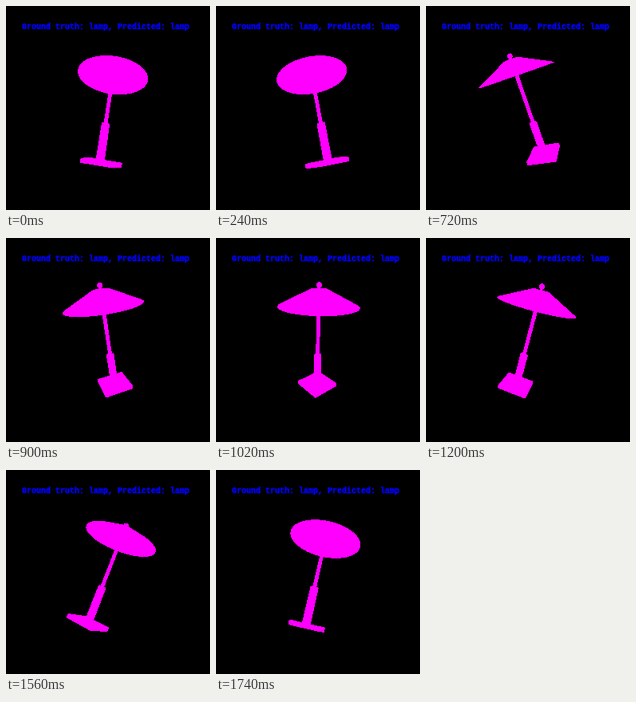
Recreate the animation shown at these times as an HTML page. Size 256 by 256 pixels, loop 1.8 s.

```html
<!DOCTYPE html>
<html lang="en">
<head>
<meta charset="utf-8">
<style>
  html, body { margin: 0; width: 100%; height: 100%; overflow: hidden; background: #000; }
  svg { display: block; width: 100vw; height: 100vh; }
  text {
    font: bold 10px "Liberation Mono", "Courier New", monospace;
    fill: #00f; stroke: #00f; stroke-width: .4; white-space: pre;
  }
  #lamp { fill: #f0f; stroke: #f0f; stroke-linejoin: round; shape-rendering: crispEdges; }
</style>
</head>
<body>
<svg viewBox="0 0 256 256">
  <rect width="256" height="256"/>
  <text x="20" y="29">Ground truth: lamp, Predicted: lamp</text>
  <g id="lamp">
    <path id="shade" stroke-width="1"/>
    <path id="base" stroke-width="3"/>
    <path id="poles" stroke-width="0"/>
    <circle id="finial" stroke-width="0"/>
  </g>
</svg>
<script>
const RAD = Math.PI / 180;
const STEP = 60, STEPS = 30;
const FOCAL = 128 / Math.tan(31 * RAD);
const TILT = 22.6 * RAD, START = -21 * RAD, BASE_TURN = 7 * RAD;
const part = id => document.getElementById(id);

function project([x, y, z]) {
  const scale = FOCAL / (FOCAL - z);
  return { x: 128 + x * scale, y: 128 - y * scale, scale };
}

// Maps lamp coordinates (height on axis, radius, angle) to the screen.
function lampView(turn) {
  const s = Math.sin(turn), c = Math.cos(turn);
  const st = Math.sin(TILT), ct = Math.cos(TILT);
  const axis = [-s * st, ct, -c * st];
  const u = [-s * ct, -st, -c * ct];
  const v = [c, 0, -s];
  return (h, r = 0, a = 0) => project(axis.map((k, i) =>
    k * h + r * (u[i] * Math.cos(a) + v[i] * Math.sin(a))));
}

function ring(view, h, r, count, offset = 0) {
  return Array.from({ length: count }, (_, i) =>
    view(h, r, offset + i * 2 * Math.PI / count));
}

function hull(points) {
  const sorted = [...points].sort((a, b) => a.x - b.x || a.y - b.y);
  const chain = list => {
    const out = [];
    for (const p of list) {
      while (out.length > 1) {
        const [a, b] = out.slice(-2);
        if ((b.x - a.x) * (p.y - a.y) - (b.y - a.y) * (p.x - a.x) > 0) break;
        out.pop();
      }
      out.push(p);
    }
    return out.slice(0, -1);
  };
  return [...chain(sorted), ...chain(sorted.reverse())];
}

const pathOf = points =>
  "M" + points.map(p => p.x.toFixed(2) + " " + p.y.toFixed(2)).join("L") + "Z";

// Outline of a cylinder along the lamp axis.
function pole(view, top, bottom, radius) {
  const a = view(top), b = view(bottom);
  const len = Math.hypot(b.x - a.x, b.y - a.y);
  const nx = (a.y - b.y) / len, ny = (b.x - a.x) / len;
  const side = (p, k) => ({ x: p.x + nx * k * p.scale, y: p.y + ny * k * p.scale });
  return pathOf([side(a, radius), side(b, radius), side(b, -radius), side(a, -radius)]);
}

function draw(time) {
  const step = Math.floor(time / STEP) % STEPS;
  const view = lampView(START + step * 2 * Math.PI / STEPS);

  part("shade").setAttribute("d", pathOf(hull([
    ...ring(view, 43, 46.3, 72), ...ring(view, 61.5, 9, 24)])));
  part("base").setAttribute("d", pathOf(hull([
    ...ring(view, -64.7, 25.3, 4, BASE_TURN), ...ring(view, -67.5, 25.3, 4, BASE_TURN)])));
  part("poles").setAttribute("d",
    pole(view, 66, 58, 1.8) + pole(view, 50, -20, 2.4) +
    pole(view, -19, -21, 4.2) + pole(view, -20, -66, 5));

  const knob = view(66);
  const finial = part("finial");
  finial.setAttribute("cx", knob.x);
  finial.setAttribute("cy", knob.y);
  finial.setAttribute("r", 3.2 * knob.scale);
}

const begin = performance.now();
function tick() {
  draw(performance.now() - begin);
  requestAnimationFrame(tick);
}
tick();
</script>
</body>
</html>
```
